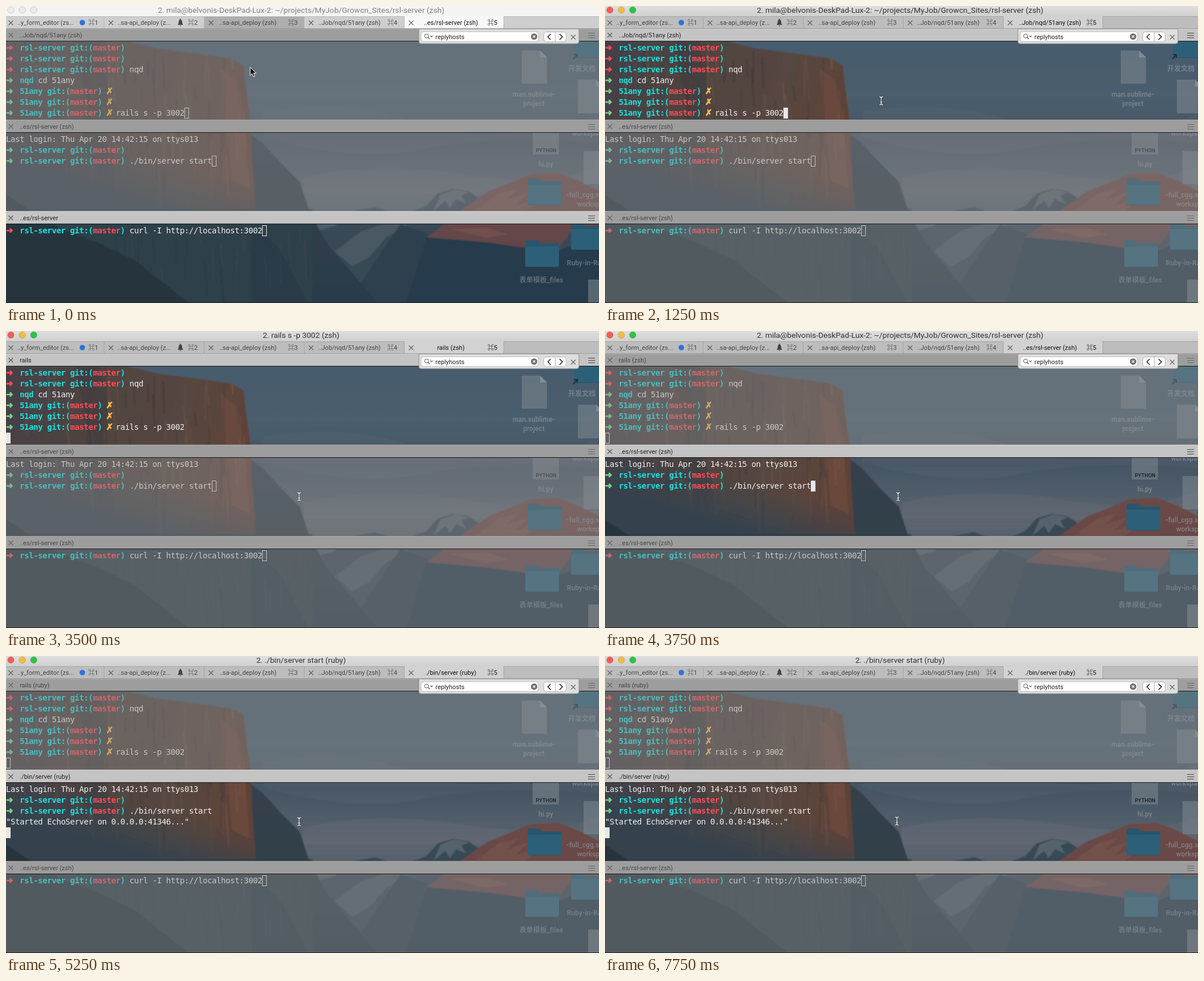
Write an HTML page that moves like this. It is 1037 px wide and 520 px high and loops after 8 s.

```html
<!DOCTYPE html>
<html lang="en">
<head>
<meta charset="utf-8">
<title>Terminal panes</title>
<style>
  html, body { margin: 0; width: 100%; height: 100%; overflow: hidden; background: #333; }
  svg { display: block; width: 100vw; height: 100vh; }
  text { white-space: pre; font-family: Roboto, "Noto Sans CJK SC", "DejaVu Sans", sans-serif; }
  .mono { font: 14px "DejaVu Sans Mono", monospace; letter-spacing: -.43px; }
  .bold { font-weight: 700; }
  .sign { font: 15px "DejaVu Sans", sans-serif; paint-order: stroke; }
  .tab { font-size: 11px; }
  .title { font-size: 13.7px; text-anchor: middle; }
  .icon { font-size: 12px; font-weight: 700; fill: #a4aeb5; fill-opacity: .45; text-anchor: middle; }
  .badge { font-size: 9px; font-weight: 700; fill: #222b31; text-anchor: middle; }
  .center { text-anchor: middle; }
</style>
</head>
<body>
<svg viewBox="0 0 1037 520" preserveAspectRatio="none">
  <defs>
    <linearGradient id="sky" x2="0" y2="1">
      <stop offset="0" stop-color="#435a6c"/>
      <stop offset=".3" stop-color="#4b5e6e"/>
      <stop offset=".45" stop-color="#455563"/>
      <stop offset=".65" stop-color="#5c6570"/>
      <stop offset="1" stop-color="#2d4152"/>
    </linearGradient>
    <linearGradient id="rock" x2="1" y2=".15">
      <stop offset="0" stop-color="#454148"/>
      <stop offset=".4" stop-color="#50443f"/>
      <stop offset=".75" stop-color="#57463f"/>
      <stop offset="1" stop-color="#5e4339"/>
    </linearGradient>
    <linearGradient id="shade" gradientUnits="userSpaceOnUse" x1="212" y1="245" x2="185" y2="335">
      <stop offset="0" stop-color="#37444f" stop-opacity="0"/>
      <stop offset="1" stop-color="#35434e"/>
    </linearGradient>
    <linearGradient id="slope" x2="0" y2="1">
      <stop offset="0" stop-color="#36424c"/>
      <stop offset="1" stop-color="#2a3b48"/>
    </linearGradient>
    <linearGradient id="red" x2="0" y2="1">
      <stop offset="0" stop-color="#6c4a46"/>
      <stop offset="1" stop-color="#624549"/>
    </linearGradient>
    <linearGradient id="bar" x2="0" y2="1">
      <stop offset="0" stop-color="#dedede"/>
      <stop offset="1" stop-color="#d0d0d0"/>
    </linearGradient>
    <clipPath id="cliff"><path d="M0 62H215L262 74 332 83 395 92 416 104 421 150 428 200 430 260 437 358 0 358Z"/></clipPath>
    <filter id="soft" x="0" y="0" width="1" height="1"><feGaussianBlur stdDeviation="1.3"/></filter>
  </defs>
  <g id="wall"></g>
  <g id="ui"></g>
</svg>
<script>
const LOOP = 8000;
const PATH = '2. mila@belvonis-DeskPad-Lux-2: ~/projects/MyJob/';
const SITE = '..es/rsl-server', ANY = '..Job/nqd/51any (zsh)';
const INK = '#efefef', CYAN = '#14e3e0', RED = '#ff4b55', GREEN = '#72d68a', GOLD = '#fdc04e';

// Each step patches the state before it.
const steps = [
  [0, { active: 2, focus: false, hover: '#aeaeae', title: PATH + 'Growcn_Sites/rsl-server (zsh)',
        tab: SITE + ' (zsh)', heads: [ANY, SITE + ' (zsh)', SITE],
        rails: false, server: 0, mouse: 'arrow', x: 427, y: 107 }],
  [250, { hover: '#bebebe', x: 415, y: 166 }],
  [500, { hover: null, x: 412, y: 167 }],
  [1000, { focus: true, mouse: 'beam', x: 412, y: 166 }],
  [1250, { active: 0, tab: ANY, heads: [ANY, SITE + ' (zsh)', SITE + ' (zsh)'], x: 483 }],
  [1500, { title: PATH + 'nqd/51any (zsh)' }],
  [2000, { rails: true, tab: 'rails (zsh)', heads: ['rails', SITE + ' (zsh)', SITE + ' (zsh)'], x: 484 }],
  [2250, { title: '2. rails s -p 3002 (zsh)' }],
  [3250, { x: 509.5, y: 282 }],
  [3500, { x: 512.5, y: 290 }],
  [3750, { active: 1, title: PATH + 'Growcn_Sites/rsl-server (zsh)', tab: SITE + ' (zsh)',
           heads: ['rails (zsh)', SITE + ' (zsh)', SITE + ' (zsh)'] }],
  [4500, { server: 1, title: '2. ./bin/server start (zsh)', tab: './bin/server (zsh)',
           heads: ['rails (zsh)', './bin/server (zsh)', SITE + ' (zsh)'], x: 514 }],
  [5000, { x: 512.5 }],
  [5250, { server: 2, title: '2. ./bin/server start (ruby)', tab: './bin/server (ruby)',
           heads: ['rails (ruby)', './bin/server (ruby)', SITE + ' (zsh)'] }],
  [7500, { y: 289 }],
  [7750, { x: 510.5 }],
];
const states = [];
steps.forEach(([, patch], i) => states.push({ ...states[i - 1], ...patch }));

const rect = (x, y, w, h, fill, more = '') =>
  `<rect x="${x}" y="${y}" width="${w}" height="${h}" fill="${fill}" ${more}/>`;
const path = (d, fill, more = '') => `<path d="${d}" fill="${fill}" ${more}/>`;
const line = (d, color, width = 1) => path(d, 'none', `stroke="${color}" stroke-width="${width}"`);
const text = (x, y, str, cls, fill, more = '') =>
  `<text x="${x}" y="${y}" class="${cls}"${fill ? ` fill="${fill}"` : ''} ${more}>${str}</text>`;
const cross = (x, y, color = '#5f5f5f', r = 4) =>
  line(`M${x - r} ${y - r}l${2 * r} ${2 * r}m0 ${-2 * r}l${-2 * r} ${2 * r}`, color, 1.1);

function landscape() {
  let seed = 7;
  const rnd = () => (seed = seed * 16807 % 2147483647) / 2147483647;
  const streaks = (n, x, w, y, h) => Array.from({ length: n }, () => {
    const sx = x + rnd() * w, sy = y + rnd() * h;
    return line(`M${sx} ${sy}l${rnd() * 6 - 1} ${25 + rnd() * 50}`,
      rnd() < .55 ? 'rgba(35,35,42,.22)' : 'rgba(150,118,102,.16)', 1 + rnd() * 3);
  }).join('');
  return rect(0, 0, 1037, 520, 'url(#sky)') +
    path('M450 185Q600 160 720 205T1037 190V240Q850 225 730 250T450 230Z', '#6b7680', 'opacity=".15"') +
    path('M520 300Q650 270 800 295T1037 280V330H520Z', '#777b83', 'opacity=".2"') +
    // valley and far peaks
    path('M525 400L575 385 605 360 645 352 690 368 735 350 755 328 782 320 808 324 835 342 870 358 1037 370V520H525Z', '#374957') +
    path('M748 358L760 330 784 321 810 326 796 332 805 346 787 338 776 354 768 341Z', '#6c767e', 'opacity=".6"') +
    path('M575 430L620 395 660 382 705 382 665 405 635 440 605 456 590 442Z', '#5d6a73', 'opacity=".5"') +
    path('M690 382L735 398 790 450 850 520H600L640 455Z', '#2d404e') +
    // sunlit ridge
    path('M790 362L842 325 880 310 918 294 965 292 1002 306 1037 324V400L990 392 960 431 890 425 842 414 735 405 765 384Z', 'url(#red)') +
    path('M820 359L862 328 897 319 875 339 915 326 890 350 946 332 908 359ZM775 390L840 388 880 400 838 406Z', '#805b53', 'opacity=".45"') +
    path('M735 405L842 414 960 431 1037 400V520H700Z', '#283b4b') +
    // near cliff
    path('M425 222L448 239 482 276 514 308 530 358 560 414 608 470 650 520H0V320L430 350Z', 'url(#slope)') +
    `<g clip-path="url(#cliff)">${rect(0, 55, 440, 305, 'url(#rock)')}${streaks(95, 0, 435, 55, 235)}` +
    path('M165 62L178 145 168 215 190 270 175 300 130 250 142 170 120 62Z', '#3a3a42', 'opacity=".5"') +
    path('M375 110L402 130 418 225 426 320 395 305 388 210Z', '#7d5445', 'opacity=".4"') +
    rect(0, 222, 440, 140, 'url(#shade)') + '</g>' +
    rect(0, 355, 536, 165, '#30404b', 'opacity=".7"') +
    `<g opacity=".5">${streaks(40, 190, 340, 382, 80)}</g>` +
    path('M0 330L45 360 95 390 160 414 225 445 275 485 320 520H0Z', '#25343c') +
    path('M430 382L478 424 505 475 528 520H430Z', '#273845', 'opacity=".5"');
}

function desktop() {
  const folder = (x, y) =>
    path(`M${x} ${y + 4}q0-4 4-4h16l5 5h31q3 0 3 3v36q0 3-3 3h-53q-3 0-3-3Z`, '#28566c') +
    path(`M${x} ${y + 11}h59v32q0 3-3 3h-53q-3 0-3-3Z`, '#2c6078');
  const doc = (x, y, w, h) =>
    path(`M${x} ${y}h${w - 12}l12 12v${h - 12}h${-w}Z`, '#79848c', 'opacity=".6"') +
    path(`M${x + w - 12} ${y}v12h12Z`, '#929ca2', 'opacity=".6"');
  return folder(993, 44) + doc(902, 78, 44, 58) + doc(1000, 129, 44, 59) +
    line('M992 93L999 85M993 85h6v6', '#252d33', 2) +
    doc(921, 204, 46, 56) + doc(1010, 254, 44, 58) + folder(912, 302) +
    folder(908, 410) + folder(988, 380) + doc(1018, 479, 44, 58) +
    text(944.5, 256, 'PYTHON', 'badge') +
    [[1007, 114, '开发文档'], [923, 159, 'man.sublime-'], [923, 175, 'project'], [1019, 227, 'workspace'],
     [944, 281, 'hi.py'], [1012, 335, '-full_cgg.su'], [1028, 351, 'workspace'],
     [1011, 454, 'Ruby-in-Ra'], [936, 484, '表单模板_files']].map(a => text(...a, 'icon')).join('');
}

// Terminal rows: segments are [string, colour, bold].
function row(mid, segments) {
  let col = 0;
  return segments.map(([str, color, bold]) => {
    const sign = '➜✗'.includes(str);
    const x = col * 8 - (sign && col ? 1 : 0);
    col += str.length;
    return sign
      ? text(x, mid + 5, str, 'sign', color, `stroke="${color}" stroke-width=".8"`)
      : text(x, mid + 5, str, bold ? 'mono bold' : 'mono', color);
  }).join('');
}
const lead = color => [['➜', color], ['  ', INK]];
const git = (dir, color) => [...lead(color), [dir + ' git:(', CYAN, 1], ['master', RED, 1], [') ', CYAN, 1]];
const cursor = (x, mid, solid) => solid
  ? rect(x, mid - 9, 8, 19, '#e8e8e8')
  : rect(x + .5, mid - 8.5, 7, 18, 'none', 'stroke="#e8e8e8"');

function paneText(s, index, solid) {
  const rsl = (color, cmd = '') => [...git('rsl-server', color), [cmd, INK]];
  const any = (cmd = '') => [...git('51any', GREEN), ['✗', GOLD], [cmd, INK]];
  const rows = [
    [rsl(RED), rsl(RED), rsl(RED, 'nqd'), [...lead(GREEN), ['nqd ', CYAN, 1], ['cd 51any', INK]],
     any(), any(), any(' rails s -p 3002')].slice(s.rails ? 1 : 0),
    [[['Last login: Thu Apr 20 14:42:15 on ttys013', INK]], rsl(GREEN), rsl(GREEN, './bin/server start')],
    [rsl(RED, 'curl -I http://localhost:3002')],
  ][index];
  if (index === 1 && s.server === 2) rows.push([['"Started EchoServer on 0.0.0.0:41346..."', INK]]);
  const top = 73 + index * 160;
  const fresh = index === 0 ? s.rails : index === 1 && s.server > 0;
  const last = fresh ? rows.length : rows.length - 1;
  return rows.map((r, i) => row(top + i * 19, r)).join('') +
    cursor(fresh ? 0 : [312, 360, 448][index], top + last * 19, solid);
}

function pane(s, index) {
  const y = index ? 39 + index * 160 : 40, mid = 51 + index * 160, on = s.active === index;
  const end = index < 2 ? 199 + index * 160 : 520;
  return paneText(s, index, on && s.focus) +
    (on ? '' : rect(0, mid + 11, 1037, end - mid - 11, '#8c8c8c', 'opacity=".42"')) +
    rect(0, y, 1037, mid + 10 - y, on ? '#c4c4c4' : '#9d9d9d') +
    rect(0, y, 1037, 1, on ? '#d2d2d2' : '#aaa') + rect(0, mid + 10, 1037, 1, '#16191c') +
    cross(8.5, mid, on ? '#555' : '#666') +
    text(24, mid + 4, s.heads[index], 'tab', on ? '#222' : '#464646') +
    line(`M1018 ${mid - 3.5}h12m-12 4h12m-12 4h12`, on ? '#444' : '#666', 1.2);
}

function chrome(s) {
  const bg = s.focus ? '#bdbdbd' : '#cecece', edge = s.focus ? '#a5a5a5' : '#b9b9b9';
  const lights = s.focus ? ['#fb5b55', '#f5bb3c', '#2ac443'] : ['#ececec', '#ececec', '#ececec'];
  const labels = [[20, '..y_form_editor (zs...', 144], [195, '..sa-api_deploy (z...', 318],
    [373, '..sa-api_deploy (zsh)', 493], [546, '..Job/nqd/51any (zsh)', 667]];
  return rect(0, 0, 1037, 18, s.focus ? 'url(#bar)' : '#f4f4f4') + rect(0, 18, 1037, 22, bg) +
    lights.map((c, i) => `<circle cx="${8.5 + i * 20}" cy="7" r="5.7" fill="${c}" stroke="${s.focus ? 'rgba(0,0,0,.15)' : '#c9c9c9'}"/>`).join('') +
    text(516, 12, s.title, 'title', s.focus ? '#303030' : '#808080') +
    (s.hover ? rect(346, 18, 175, 21, s.hover) : '') +
    rect(696, 18, 174, 22, s.focus ? '#d2d2d2' : '#f8f8f8') +
    rect(0, 18, 696, 1, edge) + rect(870, 18, 167, 1, edge) + rect(0, 39, 1037, 1, '#999') +
    [171, 346, 521, 696, 870].map(x => rect(x, 18, 1, 21, edge)).join('') +
    [8, 183, 358, 533, 708].map(x => cross(x + .5, 29.5)).join('') +
    labels.map(([x, str, key], i) => text(x, 33, str, 'tab', '#444') + text(key, 33, '⌘' + (i + 1), 'tab', '#444')).join('') +
    text(778, 33, s.tab, 'tab center', '#111') + text(842, 33, '⌘5', 'tab', '#111') +
    '<circle cx="133.5" cy="29" r="4.8" fill="#2f73dd"/>' +
    path('M300 33q2-2 2-5 0-4 3-4.5 3 .5 3 4.5 0 3 2 5ZM303.5 34h3l-1.5 1.5ZM304 22.5h2v2h-2Z', '#444');
}

function search() {
  return path('M722 40H1002V62q0 4-4 4H726q-4 0-4-4Z', '#dedede', 'stroke="#8c8c8c"') +
    rect(726, 45, 205, 17, '#fff', 'rx="4" stroke="#bcbcbc"') +
    '<circle cx="735.5" cy="52.5" r="3.5" fill="none" stroke="#555"/>' +
    line('M738 55l3 3M742 52l2 2 2-2', '#555', 1.1) + text(751, 58, 'replyhosts', 'tab', '#222') +
    '<circle cx="923.5" cy="53.5" r="5.5" fill="#6d6d6d"/>' + cross(923.5, 53.5, '#fff', 2) +
    rect(940.5, 45.5, 39, 17, '#fff', 'rx="4" stroke="#b5b5b5"') + rect(960, 46, 1, 16, '#b5b5b5') +
    line('M952.5 49l-5 5 5 5M968 49l5 5-5 5', '#222', 1.5) + cross(992, 54.5, '#666');
}

function pointer({ mouse, x, y }) {
  if (mouse === 'arrow')
    return path(`M${x} ${y}v14.5l3.3-3 2.5 5.5 2.4-1-2.4-5.3h4.5Z`, '#111', 'stroke="#fff"');
  const beam = `M${x - 3} ${y - 7}q3 0 3 2.5v9q0 2.5-3 2.5M${x + 3} ${y - 7}q-3 0-3 2.5v9q0 2.5 3 2.5M${x - 1.5} ${y + 2.5}h3`;
  return line(beam, 'rgba(25,25,25,.6)', 2.6) + line(beam, '#ececec', 1.3);
}

const ui = document.getElementById('ui');
document.getElementById('wall').innerHTML = `<g filter="url(#soft)">${landscape()}</g>` + desktop();
const start = performance.now();
let shown = -1;

function frame() {
  const t = (performance.now() - start) % LOOP;
  const now = steps.findLastIndex(([at]) => at <= t);
  if (now !== shown) {
    shown = now;
    const s = states[now];
    ui.innerHTML = [0, 1, 2].map(i => pane(s, i)).join('') +
      rect(0, 519, 1037, 1, '#20262b') + chrome(s) + search() + pointer(s);
  }
  requestAnimationFrame(frame);
}
frame();
</script>
</body>
</html>
```
